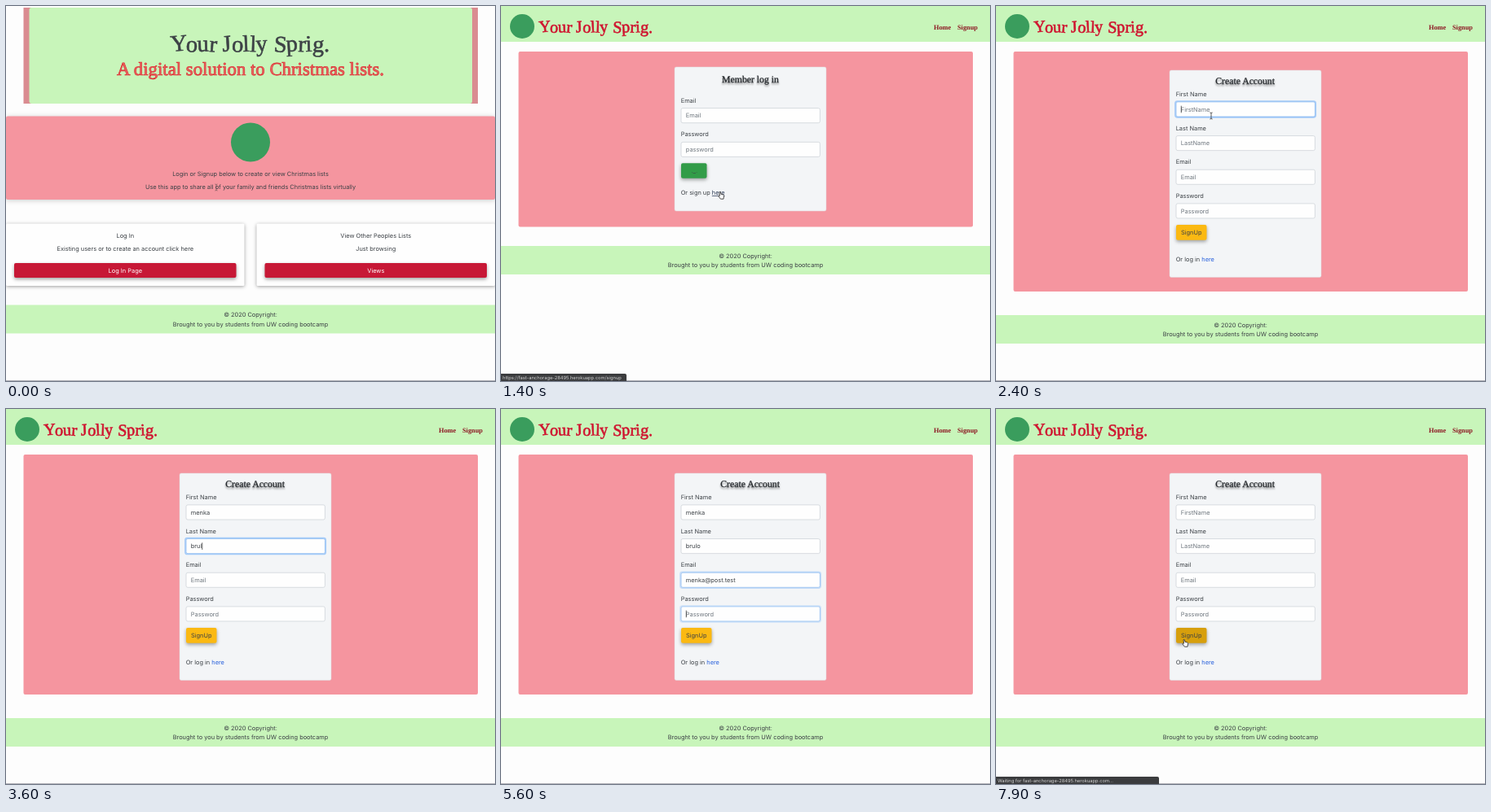
Animation of 600x461 px, one loop 8 s. Source, as an HTML page:

```html
<!DOCTYPE html>
<html lang="en">
<head>
<meta charset="utf-8">
<title>Christmas lists</title>
<style>
html, body { margin: 0; width: 100%; height: 100%; overflow: hidden; background: #fdfdfd; }
svg { display: block; width: 600px; height: 461px; }
text { font: 7.4px Inter, "Open Sans", sans-serif; fill: #3c4146; text-rendering: geometricPrecision; white-space: pre; }
.mid { text-anchor: middle; }
.title { font: 28.5px "Liberation Serif", serif; fill: #3d4246; stroke: #3d4246; stroke-width: .6; }
.brand { font: 20.4px "Liberation Serif", serif; fill: #cf1530; stroke: #cf1530; stroke-width: .6; }
.sub { font: 22.8px "Liberation Serif", serif; fill: #ea6663; stroke: #dd2a30; stroke-width: .7; }
.nav { font: bold 8.3px "Liberation Serif", serif; fill: #8c1420; }
.head { font: 11.75px "Liberation Serif", serif; fill: #22262a; stroke: #22262a; stroke-width: .25; filter: drop-shadow(0 2.5px 1px rgba(0,0,0,.45)); }
.white { fill: #fff; }
.hint { fill: #6f777f; }
.link { fill: #2a62dc; }
.status { font-size: 5.75px; fill: #d4d4d4; }
.soft { filter: drop-shadow(0 1.5px 3px rgba(0,0,0,.2)); }
.card { filter: drop-shadow(0 1.5px 2px rgba(0,0,0,.38)); }
.btn { filter: drop-shadow(0 2px 2px rgba(0,0,0,.36)); }
</style>
</head>
<body>
<svg id="stage" viewBox="0 0 600 461" xmlns="http://www.w3.org/2000/svg"></svg>
<script>
const LOOP = 8000;
const GREEN = '#c8f5ba', PINK = '#f5959f', ELF = '#3a9d5d';
const BRAND = 'Your Jolly Sprig.';
const HOST = 'fast-anchorage-28495.herokuapp.com';
const TILT = '-5 3 -2 4 0 -4 3 -3 2 -4 0 4 -3 2 -2 3 0';

const rect = (x, y, w, h, fill, more = '') =>
  `<rect x="${x}" y="${y}" width="${w}" height="${h}" fill="${fill}" ${more}/>`;
const text = (x, y, s, cls = '', more = '') =>
  `<text x="${x}" y="${y}" class="${cls}" ${more}>${s}</text>`;
const mid = (x, y, s, cls = '', more = '') => text(x, y, s, 'mid ' + cls, more);
const dot = (x, y, r) => `<circle cx="${x}" cy="${y}" r="${r}" fill="${ELF}"/>`;

const footer = y => rect(0, y, 600, 35, GREEN) +
  mid(300, y + 14.6, '© 2020 Copyright:') +
  mid(300, y + 26.4, 'Brought to you by students from UW coding bootcamp');

const choice = (x, title, note, label, id) =>
  rect(x, 267.5, 292.5, 76.5, '#fefefe', 'rx="1.5" class="card"') +
  mid(x + 146.3, 284.8, title) + mid(x + 146.3, 301.2, note) +
  rect(x + 10, 316, 272.5, 18, '#c71836', `id="${id}" rx="2" class="btn"`) +
  mid(x + 146.3, 327.7, label, 'white');

const navbar = rect(0, 0, 600, 44, GREEN) + dot(26, 25, 15) +
  text(47, 32.5, BRAND, 'brand', `rotate="${TILT}"`) +
  text(531, 29, 'Home', 'nav') + text(560, 29, 'Signup', 'nav');

const panel = (bottom, top, end) =>
  rect(21.5, 56, 557.5, bottom - 56, PINK, 'rx="2"') +
  rect(213, top, 186, end - top, '#f3f5f7', 'rx="2" stroke="#dfd5d9" stroke-width=".5"');

const field = (y, label, hint, id) => text(220.7, y - 7, label) +
  rect(219.9, y - .9, 172.4, 19.9, 'none', `id="${id}Ring" rx="2.6" stroke="#a5cbf8" stroke-width="1.6" opacity="0"`) +
  rect(221, y, 170.4, 18.1, '#fefefe', `id="${id}Box" rx="2" stroke="#c9ced4" stroke-width=".7"`) +
  text(226.8, y + 11.8, hint, 'hint', `id="${id}"`);

const FIRST_Y = 117.9, STEP = 41.65;
const fields = [
  { id: 'first', label: 'First Name', hint: 'FirstName', value: 'menka', from: 2250, to: 3200, start: 2700, pace: 100 },
  { id: 'last', label: 'Last Name', hint: 'LastName', value: 'brulo', from: 3200, to: 3900, start: 3280, pace: 100 },
  { id: 'mail', label: 'Email', hint: 'Email', value: 'menka@post.test', from: 3900, to: 5540, start: 4280, pace: 78 },
  { id: 'pass', label: 'Password', hint: 'Password', value: '•••••', from: 5540, to: 7050, start: 5900, pace: 120 }
];
fields.forEach((f, i) => f.y = FIRST_Y + i * STEP);
const CLEAR = 7170;

const home = `<g id="home"><g id="scroll">` +
  rect(21.5, 2, 557.5, 118, '#da8c91') + rect(28.5, 2, 543.5, 118, GREEN, 'rx="3"') +
  mid(300, 56, BRAND, 'title', `rotate="${TILT}"`) +
  mid(300, 84.5, 'A digital solution to Christmas lists.', 'sub') +
  rect(0, 135.5, 600, 102.5, PINK, 'rx="2" class="soft"') + dot(300, 167.5, 24) +
  mid(300, 208.6, 'Login or Signup below to create or view Christmas lists') +
  mid(300, 225.2, 'Use this app to share all of your family and friends Christmas lists virtually') +
  choice(0, 'Log In', 'Existing users or to create an account click here', 'Log In Page', 'loginBtn') +
  choice(307.5, 'View Other Peoples Lists', 'Just browsing', 'Views', 'viewBtn') +
  rect(9.3, 315.3, 274, 19.4, 'none', 'id="loginRing" rx="2.5" stroke="#e58b99" stroke-width="1.5"') +
  footer(367.5) + `</g></g>`;

const login = `<g id="login">` + panel(271.5, 75, 252) +
  mid(306, 94, 'Member log in', 'head') +
  field(125.6, 'Email', 'Email', 'inMail') + field(167.3, 'Password', 'password', 'inPass') +
  rect(221, 193.3, 31.5, 18.5, '#329c48', 'rx="2" class="btn"') + mid(237.3, 205.3, '._.', '', 'font-weight="bold"') +
  text(220.7, 232, 'Or sign up <tspan id="here" class="link">here</tspan>') + footer(295) + `</g>`;

const signup = `<g id="signup">` + panel(351, 79, 333.5) +
  mid(305.6, 95.7, 'Create Account', 'head') +
  fields.map(f => field(f.y, f.label, f.hint, f.id)).join('') +
  `<path id="caret" stroke="#222" stroke-width=".7"/>` +
  rect(221, 269, 37.5, 18.7, '#fbb912', 'id="join" rx="2" class="btn"') + mid(239.7, 281, 'SignUp') +
  text(220.7, 313.6, 'Or log in <tspan class="link">here</tspan>') + footer(380) + `</g>`;

const pointers = `<g id="pointer" stroke-linejoin="round">
  <path id="arrow" d="M0 0V8.2L2 6.4 3.3 9.3 4.5 8.8 3.3 6H6Z" fill="#111" stroke="#fff" stroke-width=".6"/>
  <path id="hand" d="M-1.9-4.4Q-1-5.2-.5-4.1L0-1.7 2.7-1Q3.6-.6 3.5.6L3 4.2H-.6L-3.1.9Q-3.3-.4-1.5.2Z" fill="#fff" stroke="#222" stroke-width=".8"/>
  <path id="beam" d="M-1.6-4Q0-4 0-3Q0-4 1.6-4M0-3V3M-1.6 4Q0 4 0 3Q0 4 1.6 4" fill="none" stroke="#333" stroke-width=".8"/></g>`;

const stage = document.getElementById('stage');
stage.innerHTML = rect(0, 0, 600, 461, '#fdfdfd') + home +
  `<g id="top">${navbar}</g>` + login + signup + rect(0, 460, 600, 1, '#b4b4ba') +
  `<g id="bar">` + rect(-2, 452, 202, 11, '#3b3c3e', 'id="barBox" rx="2"') +
  text(2, 459, '', 'status', 'id="barText"') + `</g>` + pointers;

const el = {};
stage.querySelectorAll('[id]').forEach(n => el[n.id] = n);
const set = (id, name, v) => el[id].setAttribute(name, v);
const show = (id, on) => set(id, 'display', on ? 'inline' : 'none');
const ramp = (t, a, b) => Math.min(1, Math.max(0, (t - a) / (b - a)));
const ease = k => k * k * (3 - 2 * k);
const within = (t, a, b) => t >= a && t < b;

// time, x, y
const route = [
  [0, 258, 223], [60, 258, 223], [500, 192, 323], [900, 192, 323], [1300, 270, 233],
  [1920, 270, 233], [2230, 264, 135], [6600, 264, 135], [7000, 232, 288], [LOOP, 232, 288]
];
function place(t) {
  const i = Math.max(1, route.findIndex(p => p[0] > t));
  const [a, x, y] = route[i - 1], [b, u, v] = route[i];
  const k = ease(ramp(t, a, b));
  return [x + (u - x) * k, y + (v - y) * k];
}

const notes = [
  [450, 690, 'https://' + HOST + '/login', 152],
  [690, 960, 'Waiting for ' + HOST + '...', 200],
  [1290, 1720, 'https://' + HOST + '/signup', 154],
  [1720, 1960, 'Waiting for ' + HOST + '...', 200],
  [7370, LOOP, 'Waiting for ' + HOST + '...', 200]
];

function drawStatus(t) {
  const n = notes.find(n => within(t, n[0], n[1]));
  show('bar', n);
  if (!n) return;
  el.barText.textContent = n[2];
  set('barBox', 'width', n[3] + 2);
}

function drawField(f, t) {
  const count = t >= CLEAR ? 0 : Math.min(f.value.length, Math.max(0, Math.floor((t - f.start) / f.pace) + 1));
  const node = el[f.id];
  node.textContent = count ? f.value.slice(0, count) : f.hint;
  node.setAttribute('class', count ? '' : 'hint');
  const k = ramp(t, f.from, f.from + 140) * (1 - ramp(t, f.to, f.to + 140));
  set(f.id + 'Ring', 'opacity', k);
  set(f.id + 'Box', 'stroke', k > .25 ? '#80b4f0' : '#c9ced4');
  if (!within(t, f.from, f.to)) return;
  const last = count ? f.start + (count - 1) * f.pace : f.from;
  const x = 227.3 + (count ? node.getComputedTextLength() : 0);
  set('caret', 'd', `M${x} ${f.y + 4.8}v8.6`);
  show('caret', (t - last) % 1000 < 500);
}

function drawPointer(t) {
  const [x, y] = place(t);
  set('pointer', 'transform', `translate(${x.toFixed(2)} ${y.toFixed(2)})`);
  show('pointer', t < 2700 || t >= 6600);
  let kind = 'arrow';
  if (t < 900) kind = y > 308 ? 'hand' : y < 227 ? 'beam' : 'arrow';
  else if (t < 1960) kind = x > 258 && y < 236 ? 'hand' : 'arrow';
  else if (y > 269 && y < 290) kind = 'hand';
  else if (fields.some(f => within(y, f.y, f.y + 18))) kind = 'beam';
  ['arrow', 'hand', 'beam'].forEach(id => show(id, id === kind));
  set('beam', 'opacity', t < 900 ? .55 : 1);
}

function draw(t) {
  show('home', t < 900);
  show('top', t >= 900);
  show('login', within(t, 900, 1960));
  show('signup', t >= 1960);
  set('scroll', 'transform', `translate(0 ${-3 * ease(ramp(t, 60, 350))})`);
  set('loginBtn', 'fill', t > 450 ? '#b00a25' : '#c71836');
  show('loginRing', t > 650);
  const over = t > 1290;
  set('here', 'text-decoration', over ? 'underline' : 'none');
  el.here.style.fill = over ? '#2c3a55' : '';
  show('caret', false);
  fields.forEach(f => drawField(f, t));
  set('join', 'fill', t > 6950 ? '#d79f0c' : '#fbb912');
  drawStatus(t);
  drawPointer(t);
}

const began = performance.now();
function tick() {
  draw((performance.now() - began) % LOOP);
  requestAnimationFrame(tick);
}
tick();
</script>
</body>
</html>
```
